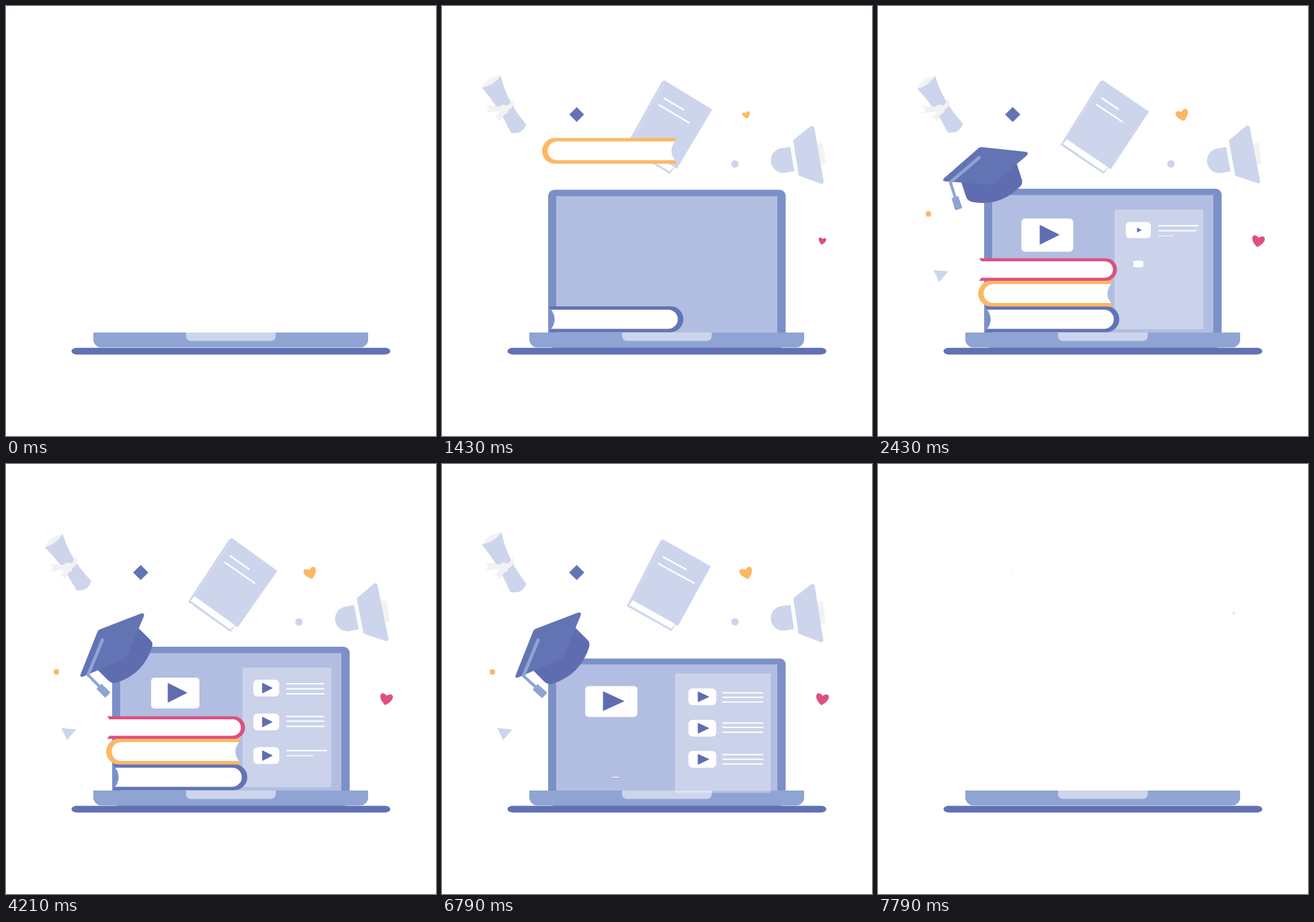
These frames come from a looping animation (640 px wide and 640 px high, 7870 ms). An HTML page with a canvas:

```html
<!DOCTYPE html>
<html lang="en">
<head>
<meta charset="utf-8">
<title>Online learning</title>
<style>
html, body { margin: 0; width: 100%; height: 100%; overflow: hidden; background: #fff; }
canvas { display: block; width: 640px; height: 640px; }
</style>
</head>
<body>
<canvas id="stage" width="640" height="640"></canvas>
<script>
const ctx = document.getElementById('stage').getContext('2d');
const LOOP = 7870;
const DEG = Math.PI / 180;
const C = {
  navy: '#6374b5', deep: '#5f6db0', shelf: '#6271b4', frame: '#7c90c8', screen: '#b2bee1',
  base: '#8fa4d2', pale: '#cdd5ec', grey: '#f2f2f2', white: '#fff',
  orange: '#fdb864', pink: '#de4f80', panel: 'rgba(255,255,255,.32)'
};

// Easing
const clamp = v => Math.min(1, Math.max(0, v));
const span = (t, start, len) => clamp((t - start) / len);
const inOut = p => p < .5 ? 4 * p ** 3 : 1 - 4 * (1 - p) ** 3;
const backIn = p => 2.70158 * p ** 3 - 1.70158 * p ** 2;
const backOut = p => 1 - backIn(1 - p);

// Scale of a part that pops in and later pops out
function pop(t, start, end, outLen = 900, inLen = 700) {
  if (t < start) return 0;
  return Math.max(0, t < end ? backOut(span(t, start, inLen)) : 1 - backIn(span(t, end, outLen)));
}

// Drawing helpers
function fill(d, color) {
  ctx.fillStyle = color;
  ctx.fill(new Path2D(d));
}

function box(x, y, w, h, r, color) {
  ctx.beginPath();
  ctx.roundRect(x, y, w, h, r);
  ctx.fillStyle = color;
  ctx.fill();
}

function disc(x, y, r, color) {
  ctx.beginPath();
  ctx.arc(x, y, r, 0, 7);
  ctx.fillStyle = color;
  ctx.fill();
}

function line(x1, y1, x2, y2, width, color) {
  ctx.beginPath();
  ctx.moveTo(x1, y1);
  ctx.lineTo(x2, y2);
  ctx.lineWidth = width;
  ctx.lineCap = 'round';
  ctx.strokeStyle = color;
  ctx.stroke();
}

// Run draw() scaled and turned about the point (x, y)
function about(x, y, scale, angle, draw) {
  if (scale <= 0) return;
  ctx.save();
  ctx.translate(x, y);
  ctx.rotate(angle * DEG);
  ctx.scale(scale, scale);
  ctx.translate(-x, -y);
  draw();
  ctx.restore();
}

// Floating parts
function diploma() {
  fill('M58 124 Q62 110 84 104 L88 114 L66 132Z', C.grey);
  fill('M58 124 Q77 118 84 104 Q97 144 127 174 Q122 190 105 188 Q84 150 58 124Z', C.pale);
  fill('M87 150 L65 149 L71 154 L67 160 L87 157Z', C.grey);
  fill('M88 158 L79 167 L85 167 L87 173 L95 159Z', C.grey);
  fill('M94 149 Q102 146 103 138 L107 145 Q104 152 97 156Z', C.grey);
  disc(92, 154, 7.3, C.grey);
}

function textbook(t) {
  fill('M331 114 Q335 108 340 113 L404 159 L345 243 L341 241 L334 250 L271 205Z', C.pale);
  fill('M281 197 L341 240 L334 246.500 L274.500 203.500Z', C.white);
  line(334, 117, 281, 194, .8, '#dfe5f3');
  const wave = Math.cos((t - 2700) / 6600 * 2 * Math.PI);
  const dx = Math.cos(35 * DEG), dy = Math.sin(35 * DEG);
  const row = (x, y, len) => line(x, y, x + dx * len, y + dy * len, 2.4, C.white);
  row(334, 137, 35 - 5.7 * wave);
  row(326, 146.5, 54.5 - 8.5 * wave);
}

function megaphone() {
  fill('M557 205 L563 203 Q566 203 567 207 L571 231 Q571 234 568 235 L563 237Z', C.grey);
  fill('M522 200 L546 179.500 Q551 175 553 181 L569 259 Q570 265 564 263 L532 252.500Z', C.pale);
  fill('M518 210 L525 246 L511 248.800 A18.500 18.500 0 0 1 504 212.500Z', C.pale);
}

function heart(x, y, angle, scale, color) {
  about(x, y, scale, angle, () => {
    ctx.translate(x, y);
    fill('M0 9.500 C-15.500 -1 -9 -13 0 -4.500 C9 -13 15.500 -1 0 9.500Z', color);
  });
}

function floaters(t) {
  const sway = Math.cos((t - 3700) / LOOP * 2 * Math.PI) - .918;
  about(92, 150, pop(t, 540, 6640), -3.2 * sway, diploma);
  about(337, 181, pop(t, 420, 6210), 3.7 * sway, () => textbook(t));
  about(529, 222, pop(t, 540, 6900), -1.5 * sway, megaphone);
  about(200.5, 161.5, pop(t, 1190, 6900), 0,
    () => fill('M200.500 150.200 L211.800 161.500 L200.500 172.800 L189.200 161.500Z', C.navy));
  about(436, 235, pop(t, 750, 6700), 0, () => disc(436, 235, 5.5, C.pale));
  about(75, 309.5, pop(t, 1600, 6800), 0, () => disc(75, 309.5, 4.2, C.orange));
  about(93, 402, pop(t, 1500, 6900), 0, () => fill('M82.500 393 L104.500 395 L91 411Z', C.pale));
  const beat = pop(t, 1318, 6700, 1100);
  heart(453, 162, -17, beat, C.orange);
  heart(566, 349.5, 9, beat, C.pink);
}

// Laptop
function play(x, y, size) {
  ctx.beginPath();
  ctx.moveTo(x - size / 2, y - size / 2);
  ctx.lineTo(x + size / 2, y);
  ctx.lineTo(x - size / 2, y + size / 2);
  ctx.closePath();
  ctx.fillStyle = ctx.strokeStyle = C.deep;
  ctx.lineWidth = 1;
  ctx.lineJoin = 'round';
  ctx.fill();
  ctx.stroke();
}

const LEAVE = 6320;
const ROWS = [
  { y: 333.5, rows: [327, 334.5, 342], card: 2190, lines: [1870, 2170, 2360] },
  { y: 384, rows: [375.7, 382.8, 390.5], card: 2365, lines: [2780, 3080, 3390] },
  { y: 434, rows: [426.5, 434, 441.5], card: 2800, lines: [3700, 4070, 4280] }
];

function contents(t) {
  about(418, 392, pop(t, 1600, LEAVE), 0, () => box(352, 303, 132, 178, 0, C.panel));
  about(252, 341, pop(t, 1920, LEAVE), 0, () => box(216, 318, 72, 46, 5, C.white));
  about(255, 340.5, pop(t, 2170, LEAVE), 0, () => play(255.2, 340.5, 28));
  for (const { y, rows, card, lines } of ROWS) {
    about(387.4, y, pop(t, card, LEAVE), 0, () => box(368.2, y - 12.5, 38.5, 25, 6, C.white));
    about(389, y, pop(t, card + 165, LEAVE), 0, () => play(389, y, 14.5));
    rows.forEach((ly, i) => about(417, ly, pop(t, lines[i], LEAVE), 0,
      () => box(417, ly - 1, 57, 2, 1, C.white)));
  }
}

function laptop(t) {
  const lift = inOut(span(t, 550, 1000)) - inOut(span(t, 6540, 950));
  const lifted = draw => {
    if (lift <= 0) return;
    ctx.save();
    ctx.translate(0, 509);
    ctx.scale(1, lift);
    ctx.translate(0, -509);
    draw();
    ctx.restore();
  };
  lifted(() => {
    box(158, 272, 353.5, 237, 9, C.frame);
    box(170, 281.5, 329, 220, 0, C.screen);
  });
  box(130, 486, 409, 22.3, [0, 0, 12, 12], C.base);
  box(268, 486, 133.5, 12.5, [0, 0, 7, 7], C.pale);
  ctx.beginPath();
  ctx.roundRect(97.5, 508.8, 474.5, 10, { x: 8, y: 5 });
  ctx.fillStyle = C.shelf;
  ctx.fill();
  lifted(() => contents(t));
}

// Stacked books: dir 1 has the round spine on the right, -1 on the left
const STACK = [
  { x: 259.2, y: 466.2, w: 200, h: 38.6, bar: 5, wall: 8.3, bite: 8, dir: 1, color: C.navy, start: 560, end: 5400, len: 1410 },
  { x: 249.5, y: 428, w: 201, h: 38.4, bar: 5.2, wall: 8.3, bite: 8, dir: -1, color: C.orange, start: 1000, end: 5430, len: 1300 },
  { x: 253.2, y: 392.2, w: 205, h: 33.6, bar: 4.6, wall: 6, bite: 4, dir: 1, color: C.pink, start: 1400, end: 5430, len: 1300 }
];

function stackBook(t, b) {
  const scale = t < b.end ? 1 : 1 - backIn(span(t, b.end, b.len));
  if (scale <= 0 || t < b.start) return;
  const drop = (1 - inOut(span(t, b.start, 830))) * (b.y + 50);
  const left = -b.w / 2, r = b.h / 2, ri = r - b.bar;
  const outer = b.w / 2 - r, inner = b.w / 2 - b.wall - ri;
  ctx.save();
  ctx.translate(b.x, b.y - drop);
  ctx.scale(scale * b.dir, scale);

  ctx.beginPath();
  ctx.moveTo(left + 2.5, -ri - 1);
  ctx.lineTo(inner, -ri - 1);
  ctx.arc(inner, 0, ri + 1, -Math.PI / 2, Math.PI / 2);
  ctx.lineTo(left + 2.5, ri + 1);
  ctx.quadraticCurveTo(left + 2.5 + b.bite * 1.5, 0, left + 2.5, -ri - 1);
  ctx.fillStyle = C.white;
  ctx.fill();

  ctx.beginPath();
  ctx.moveTo(left, -r);
  ctx.lineTo(outer, -r);
  ctx.arc(outer, 0, r, -Math.PI / 2, Math.PI / 2);
  ctx.lineTo(left, r);
  ctx.lineTo(left + 3, ri);
  ctx.lineTo(inner, ri);
  ctx.arc(inner, 0, ri, Math.PI / 2, -Math.PI / 2, true);
  ctx.lineTo(left + 3, -ri);
  ctx.closePath();
  ctx.fillStyle = b.color;
  ctx.fill();
  ctx.restore();
}

// Graduation cap
function cap(t) {
  if (t < 1800) return;
  const drop = 350 * (1 - inOut(span(t, 1800, 875)));
  const tilt = 1 - inOut(span(t, 2230, 700));
  const scale = t < 6660 ? 1 : 1 - backIn(span(t, 6660, 900));
  ctx.save();
  ctx.translate(2.5 * tilt, -drop);
  about(158, 269, scale, 30 * tilt, () => {
    fill('M136 306 L152 322 Q158 328 166 325 Q205 312 217.500 272 Q219 266 215 262 L197 244 L178 286Z', C.deep);
    fill('M111 313 Q109.500 318 114.500 316.500 L174 291 Q179 289 181 284 L205 227 Q207 221 201 222.500 L140 246 Q137 247 136 250Z', C.navy);
    line(143.5, 262, 122.5, 313, 4.8, C.base);
    about(122, 314, 1, -3 * span(t, 4800, 2000), () => {
      line(122, 314, 139, 331, 4.2, C.base);
      ctx.translate(144.5, 337);
      ctx.rotate(45 * DEG);
      box(-9, -5.5, 6, 11, 2, C.base);
      box(-4, -5.5, 14, 11, 1.5, C.base);
    });
  });
  ctx.restore();
}

function frame(now) {
  const t = now % LOOP;
  ctx.fillStyle = C.white;
  ctx.fillRect(0, 0, 640, 640);
  floaters(t);
  laptop(t);
  STACK.forEach(b => stackBook(t, b));
  cap(t);
}

const begin = performance.now();
function tick() {
  frame(performance.now() - begin);
  requestAnimationFrame(tick);
}
tick();
</script>
</body>
</html>
```
